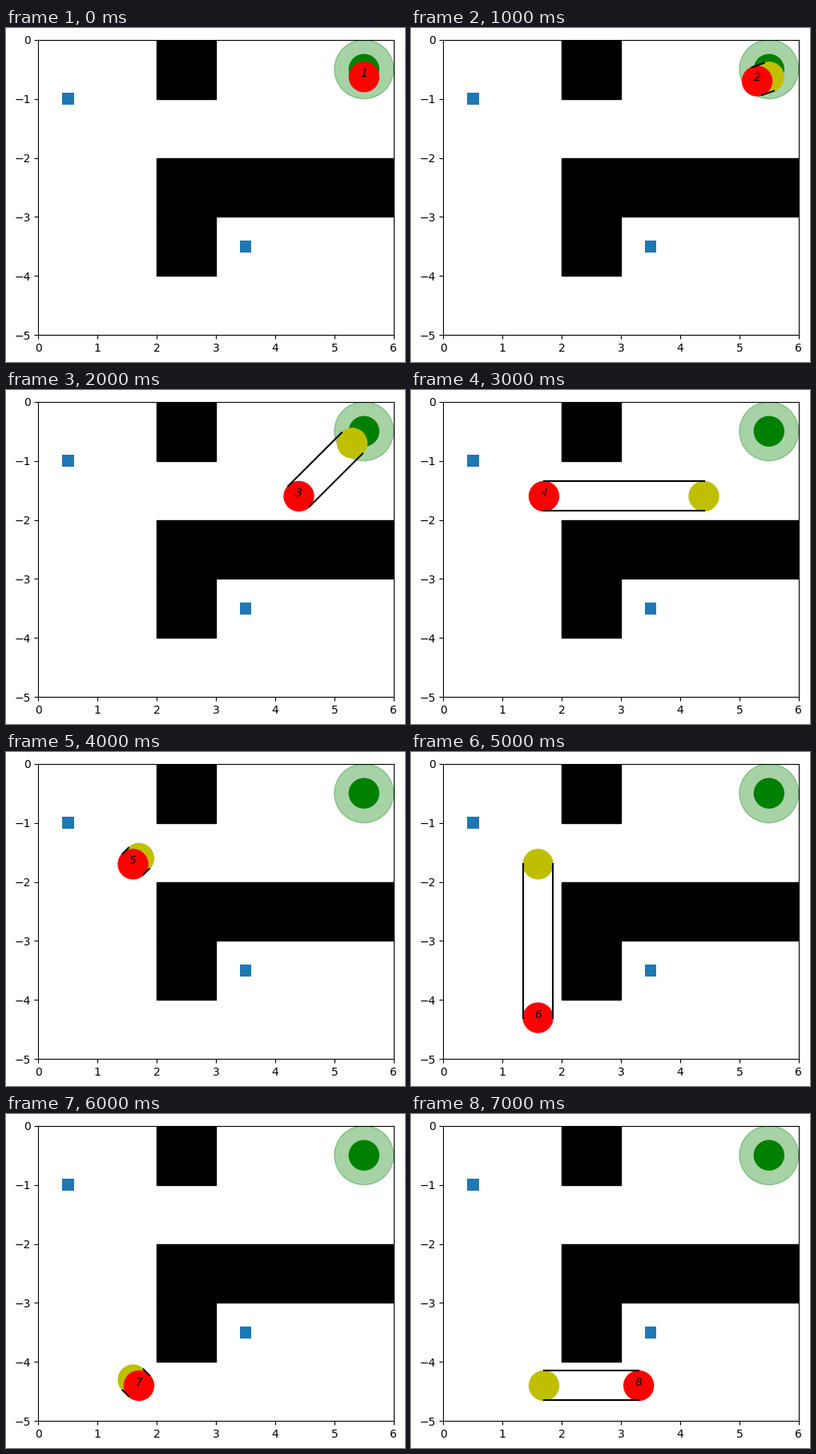
A matplotlib script for the animation above (8000 ms loop, 498 by 418 pixels).

```python
import numpy as np
import matplotlib.pyplot as plt
from matplotlib.animation import FuncAnimation
from matplotlib.patches import Circle, Rectangle

W, H, DPI = 498, 418, 100
UNIT = 73.92              # pixels per data unit
LEFT, TOP = 40.27, 14.7   # top-left corner of the axes in pixels
RADIUS = 0.25

# Successive robot positions, one per step
PATH = np.array([
    (5.5, -0.63), (5.3, -0.7), (4.4, -1.6), (1.7, -1.6),
    (1.6, -1.7), (1.6, -4.3), (1.7, -4.4), (3.3, -4.4),
])

plt.rcParams["font.family"] = "DejaVu Sans"
fig = plt.figure(figsize=(W / DPI, H / DPI), dpi=DPI, facecolor="white")
ax = fig.add_axes([LEFT / W, 1 - (TOP + 5 * UNIT) / H,
                   6 * UNIT / W, 5 * UNIT / H])
ax.set_xlim(0, 6)
ax.set_ylim(-5, 0)
ax.set_xticks(range(7))
ax.set_yticks(range(-5, 1))


def disc(center, radius, color, **kw):
    return ax.add_patch(Circle(center, radius, color=color, **kw))


# Walls
for x, y, w, h in [(2, -1, 1, 1), (2, -3, 4, 1), (2, -4, 1, 1)]:
    ax.add_patch(Rectangle((x, y), w, h, color="black"))

# Landmarks
for x, y in [(0.5, -1), (3.5, -3.5)]:
    ax.add_patch(Rectangle((x - 0.1, y - 0.1), 0.2, 0.2, facecolor="C0"))

# Start zone
disc((5.5, -0.5), 0.5, "g", alpha=0.35)
disc((5.5, -0.5), RADIUS, "g")

# Moving parts
previous = disc(PATH[0], RADIUS, "y")
robot = disc(PATH[0], RADIUS, "r")
sides = [ax.plot([], [], color="black", lw=1.5)[0] for _ in range(2)]
label = ax.text(0, 0, "", ha="center", va="baseline", style="italic",
                fontsize=10, color="black")


def update(step):
    end = PATH[step]
    start = PATH[max(step - 1, 0)]
    moving = step > 0
    robot.center = tuple(end)
    previous.center = tuple(start)
    previous.set_visible(moving)
    label.set_position(tuple(end))
    label.set_text(str(step + 1))

    dx, dy = end - start
    normal = RADIUS * np.array([-dy, dx]) / (np.hypot(dx, dy) or 1)
    for side, sign in zip(sides, (1, -1)):
        a, b = start + sign * normal, end + sign * normal
        side.set_data([a[0], b[0]], [a[1], b[1]])
        side.set_visible(moving)
    return [previous, robot, label, *sides]


anim = FuncAnimation(fig, update, frames=len(PATH), interval=1000,
                     init_func=lambda: update(0), repeat=True, repeat_delay=0)
plt.show()
```
